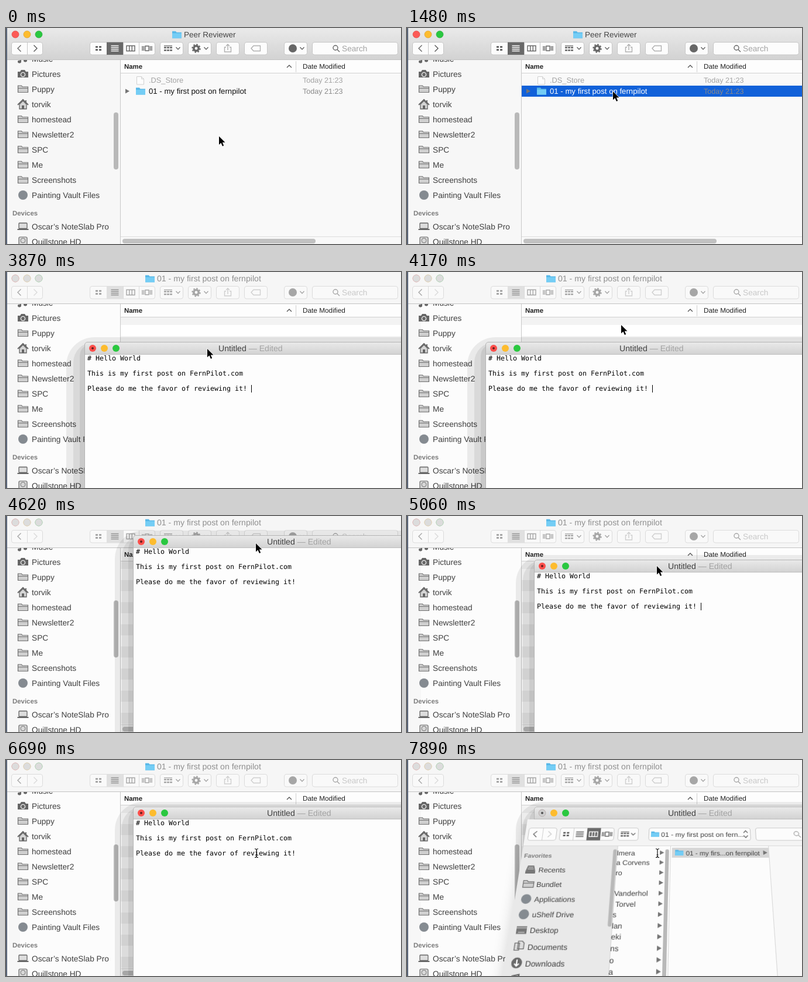
These frames come from a looping animation (675x371 px, 8000 ms). An HTML page:

```html
<!DOCTYPE html>
<html lang="en">
<head>
<meta charset="utf-8">
<title>Saving a post</title>
<style>
html, body { margin: 0; width: 100%; height: 100%; overflow: hidden; background: #f8f8f8; }
.stage { position: absolute; left: 0; top: 0; width: 675px; height: 371px; overflow: hidden; }
svg { position: absolute; left: 0; top: 0; overflow: hidden; }
text { font: 13.7px "Liberation Sans", Arial, sans-serif; fill: #3f3f3f; text-rendering: geometricPrecision; white-space: pre; }
.title { font-size: 14.1px; }
.small { font-size: 11.8px; fill: #222; }
.head { font-size: 11.4px; font-weight: bold; fill: #222; }
.group { font-size: 11.4px; font-weight: bold; fill: #7b7b7b; }
.date { font-size: 12.6px; fill: #8a8a8a; }
.pale { fill: #a3a3a3; }
.code text { font: 11.63px "DejaVu Sans Mono", monospace; fill: #000; }
.btn { fill: #fcfcfc; stroke: #c6c6c6; }
.line { fill: none; stroke: currentColor; stroke-width: 1.4; }
.solid { fill: currentColor; }
.ink { color: #666; }

/* one shared 8 s clock, hard steps */
.t { animation: 8s step-end infinite; }
.closed { animation-name: closed; }
.opened { animation-name: opened; }
.back { animation-name: back; }
.picked { animation-name: picked; }
.name { animation-name: name; }
.fwd { animation-name: fwd; }
.patch { animation-name: patch; }
.dim { animation-name: dim; }
.caption { animation-name: caption; }
.sel { animation-name: sel; }
.selicon { animation-name: selicon; }
.editor { animation-name: editor; }
.caret { animation-name: caret; }
.pressed { animation-name: pressed; }
.arrow { animation-name: arrow; }
.beam { animation-name: beam; }
@keyframes closed { 0% { visibility: visible } 22.125% { visibility: hidden } }
@keyframes opened { 0% { visibility: hidden } 22.125% { visibility: visible } }
@keyframes back { 0% { visibility: hidden } 48.375% { visibility: visible } }
@keyframes picked { 0% { visibility: hidden } 18.5% { visibility: visible } 22.125% { visibility: hidden } }
@keyframes name { 0% { fill: #111 } 18.5% { fill: #fff } }
@keyframes fwd { 0% { color: #555 } 24% { color: #c4c4c4 } }
@keyframes patch { 0% { visibility: hidden } 31.5% { visibility: visible } 48.375% { visibility: hidden } }
@keyframes dim { 0% { opacity: 1 } 48.375% { opacity: .55 } }
@keyframes caption { 0% { fill: #454545 } 48.375% { fill: #8f8f8f } }
@keyframes sel { 0% { fill: #696969 } 48.375% { fill: #cfcfcf } }
@keyframes selicon { 0% { color: #fff } 48.375% { color: #444 } }
@keyframes editor {
  0% { visibility: hidden; transform: translate(134px, 120px) }
  48.375% { visibility: visible; transform: translate(134px, 120px) }
  54% { visibility: visible; transform: translate(160px, 80px) }
  55.875% { visibility: visible; transform: translate(200px, 42px) }
  57.75% { visibility: visible; transform: translate(217px, 33px) }
  59.5% { visibility: visible; transform: translate(217px, 35px) }
  61.375% { visibility: visible; transform: translate(217px, 40px) }
  63.25% { visibility: visible; transform: translate(217px, 75px) }
  65.125% { visibility: visible; transform: translate(217px, 80px) }
}
@keyframes caret { 0% { opacity: 1 } 55.875% { opacity: 0 } 63.25% { opacity: 1 } 70.625% { opacity: 0 } }
@keyframes pressed { 0% { opacity: 0 } 96.75% { opacity: 1 } }
@keyframes arrow {
  0% { transform: translate(364px, 186px) }
  7.375% { transform: translate(363px, 172px) }
  9.25% { transform: translate(358px, 142px) }
  11% { transform: translate(354px, 119px) }
  12.875% { transform: translate(352px, 109px) }
  31.5% { transform: translate(319px, 342px) }
  33.375% { transform: translate(-40px, 0) }
  48.375% { transform: translate(344px, 132px) }
  50.25% { transform: translate(351px, 116px) }
  52.125% { transform: translate(366px, 91px) }
  54% { transform: translate(386px, 66px) }
  55.875% { transform: translate(415px, 52px) }
  57.75% { transform: translate(427px, 47px) }
  59.5% { transform: translate(427px, 48px) }
  61.375% { transform: translate(427px, 53px) }
  63.25% { transform: translate(427px, 86px) }
  65.125% { transform: translate(427px, 91px) }
  68.875% { transform: translate(-40px, 0) }
}
@keyframes beam {
  0% { transform: translate(-40px, 0) }
  68.875% { transform: translate(428px, 112px) }
  70.625% { transform: translate(428px, 132px) }
  72.5% { transform: translate(428px, 147px) }
  74.375% { transform: translate(428px, 156px) }
  76.125% { transform: translate(428px, 160px) }
}

/* the save sheet leans towards the viewer, hinged on its top edge */
.slot { position: absolute; left: 0; top: 102px; width: 675px; height: 269px; overflow: hidden; }
.sheet {
  position: absolute; left: 206px; top: 0; width: 568px; height: 390px; background: #fcfcfc;
  box-shadow: 0 4px 20px rgba(0, 0, 0, .16); transform-origin: 284px 0;
  transform: perspective(900px) rotateX(26.7deg);
  animation: sheet 8s step-end infinite;
}
.sheet text { font-size: 12px; }
.sheet .group { font-size: 10.3px; }
@keyframes sheet { 0% { visibility: hidden } 98.625% { visibility: visible } }
</style>
</head>
<body>
<div class="stage">
<svg width="675" height="371">
  <defs>
    <linearGradient id="bar" x2="0" y2="1"><stop stop-color="#eaeaea"/><stop offset="1" stop-color="#d2d2d2"/></linearGradient>
    <pattern id="rows" width="20" height="38" y="72" patternUnits="userSpaceOnUse">
      <rect width="20" height="38" fill="#fff"/><rect width="20" height="19" fill="#f3f3f3"/>
    </pattern>
    <g id="blue"><path d="M-8 -6h6l1.500 2H8V6H-8z" fill="#58b8e8"/><path d="M-8 -2.500H8V6H-8z" fill="#74cdf5"/></g>
    <g id="folder"><path d="M-8.500 5.500v-11.500h6l1.500 2h9.500v9.500z" fill="#cfcfcf" stroke="#707070" stroke-width="1.200"/><path d="M-8 -1.500H8" stroke="#707070"/></g>
    <g id="note"><path d="M-4 5V-6L6 -8V3" fill="none" stroke="#666" stroke-width="2"/><ellipse cx="-6" cy="5" rx="3" ry="2.400" fill="#666"/><ellipse cx="4" cy="3" rx="3" ry="2.400" fill="#666"/></g>
    <g id="camera"><path d="M-9 -4h4l2-3h6l2 3h4V6H-9z" fill="#666"/><circle cy="1" r="3.600" fill="#666" stroke="#eee" stroke-width="1.400"/></g>
    <g id="house"><path d="M-6 0V8H6V0L0 -6z" fill="#d5d5d5" stroke="#666" stroke-width="1.300"/><path d="M-9 1L0 -8 9 1M5 -7v4" fill="none" stroke="#666" stroke-width="1.800"/><path d="M-2 8V2h4v6z" fill="#666"/></g>
    <g id="disc"><circle r="8" fill="#858b91"/></g>
    <g id="laptop"><rect x="-7" y="-6" width="14" height="9.500" rx="1" fill="#ddd" stroke="#666" stroke-width="1.300"/><path d="M-9.500 5h19" stroke="#666" stroke-width="2"/></g>
    <g id="disk"><rect x="-7" y="-8" width="14" height="17" rx="2" fill="#d8d8d8" stroke="#666" stroke-width="1.200"/><circle cy="-2" r="4" fill="none" stroke="#777"/><path d="M-4 5h8" stroke="#777"/></g>
    <g id="tray"><path d="M-5 -7H5L8 3V7H-8V3z" fill="#777"/><path d="M-4 -4H4M-5 -1H5" stroke="#ddd"/></g>
    <g id="desk"><rect x="-8" y="-6" width="16" height="12" fill="#777"/><path d="M-8 -3.500H8M-5 3.500H5" stroke="#ddd"/></g>
    <g id="docs"><path d="M-7 -5h7v11h-7zM-2 -8h6l3 3v9h-9z" fill="#ddd" stroke="#666" stroke-width="1.200"/></g>
    <g id="down"><circle r="8" fill="#6a6a6a"/><path d="M0 -5V4M-3.500 1L0 4.500 3.500 1" fill="none" stroke="#fff" stroke-width="2"/></g>
    <path id="grid" class="solid" d="M-5 -4h4v3h-4zM1 -4h4v3H1zM-5 1h4v3h-4zM1 1h4v3H1z"/>
    <path id="list" class="line" d="M-6.500 -4.500h13M-6.500 -1.500h13M-6.500 1.500h13M-6.500 4.500h13"/>
    <path id="cols" class="line" d="M-7 -4.500H7v9H-7zM-2.300 -4.500v9M2.300 -4.500v9"/>
    <path id="flow" class="line" d="M-3 -4h6v8h-6zM-5.500 -4v8M5.500 -4v8M-8 -4v8M8 -4v8"/>
    <path id="tiles" class="solid" d="M-7 -5h14v1.300h-14zM-7 -2.500h4v2.500h-4zM-2 -2.500h4v2.500h-4zM3 -2.500h4v2.500h-4zM-7 2h4v2.500h-4zM-2 2h4v2.500h-4zM3 2h4v2.500h-4z"/>
    <path id="v" class="line" d="M-3.500 -2L0 1.700 3.500 -2"/>
    <path id="prev" class="line" d="M2.500 -5.500L-3 0 2.500 5.500"/>
    <path id="next" class="line" d="M-2.500 -5.500L3 0 -2.500 5.500"/>
    <g id="lens" class="line"><circle cx="-1" cy="-1" r="4"/><path d="M2 2l4 4"/></g>
    <path id="tri" d="M-3 -4L4 0 -3 4z" fill="#757575"/>
  </defs>

  <rect width="675" height="371" fill="#f9f9f9"/>
  <rect class="t back" x="196" y="78" width="479" height="280" fill="url(#rows)"/>
  <rect x="196" y="55" width="479" height="22" fill="#fdfdfd"/>
  <path d="M196 77.500H675M495.500 57V76" stroke="#d0d0d0"/>
  <text class="head" x="202" y="70">Name</text>
  <path d="M480 68l4-4 4 4" fill="none" stroke="#555" stroke-width="1.300"/>
  <text class="small" x="507" y="70">Date Modified</text>

  <g class="t closed">
    <path d="M223.500 83.500h8l4 4v9.500h-12zM231.500 83.500v4h4" fill="#fdfdfd" stroke="#d0d0d0"/>
    <text class="pale" style="font-size:12.800px" x="244" y="94">.DS_Store</text>
    <text class="date pale" x="507" y="94">Today 21:23</text>
    <rect class="t picked" x="196" y="99" width="479" height="19" fill="#1161d9"/>
    <use href="#tri" x="207" y="108.500"/>
    <use href="#blue" x="230" y="108.500"/>
    <text class="t name" style="font-size:13.200px" x="244" y="113">01 - my first post on fernpilot</text>
    <text class="date" x="507" y="113">Today 21:23</text>
  </g>
  <g class="t patch">
    <rect x="317" y="102" width="50" height="250" fill="url(#rows)" transform="translate(0 7)"/>
  </g>
  <path d="M196 358.500H675" stroke="#dcdcdc"/>
  <rect x="199" y="362" width="330" height="8" rx="4" fill="#c1c1c1"/>

  <rect y="55" width="195" height="316" fill="#f7f7f7"/>
  <rect class="t back" x="24" y="55" width="171" height="316" fill="#fcfcfc"/>
  <path d="M195.500 55V371" stroke="#c9c9c9"/>
  <g id="places"></g>
  <text class="group" x="11" y="322">Devices</text>
  <rect x="184" y="145" width="8" height="98" rx="4" fill="#b9b9b9"/>

  <rect width="675" height="55" fill="url(#bar)"/>
  <rect class="t back" width="675" height="55" fill="#f6f6f6"/>
  <path d="M0 54.500H675" stroke="#c2c2c2"/>
  <g stroke-width=".7">
    <g class="t lights">
      <circle cx="16" cy="11" r="6" fill="#fc5b57" stroke="#dd4440"/>
      <circle cx="36" cy="11" r="6" fill="#fdbc2e" stroke="#dc9d25"/>
      <circle cx="56" cy="11" r="6" fill="#2ac840" stroke="#25a735"/>
    </g>
    <g class="t back" fill="#dcdcdc" stroke="#d6d6d6"><circle cx="16" cy="11" r="6"/><circle cx="36" cy="11" r="6"/><circle cx="56" cy="11" r="6"/></g>
  </g>
  <g class="t dim ink">
    <g id="buttons"></g>
    <path d="M36.500 25v21M172.500 25v21M200.500 25v21M227.500 25v21" stroke="#c6c6c6"/>
    <use href="#prev" x="23" y="35"/>
    <g class="t fwd"><use href="#next" x="50" y="35"/></g>
    <rect class="t sel" x="172" y="24.500" width="28" height="21.500"/>
    <use href="#grid" x="158" y="35"/>
    <g class="t selicon"><use href="#list" x="186" y="35"/></g>
    <use href="#cols" x="213" y="35"/><use href="#flow" x="241" y="35"/>
    <use href="#tiles" x="277" y="35"/><use href="#v" x="294" y="35"/>
    <circle cx="325" cy="35" r="4.200" class="line" style="stroke-width:3.600"/>
    <circle cx="325" cy="35" r="6.700" class="line" style="stroke-width:2;stroke-dasharray:2.630"/>
    <use href="#v" x="342" y="35"/>
    <g color="#b0b0b0"><path class="line" d="M376 33h-2.500v8h11v-8H382M379 38V28M376 31l3-3 3 3"/>
    <path class="line" d="M419 35l4-4.500h11.500v9H423z"/></g>
    <circle cx="490" cy="35" r="7" fill="#666"/><use href="#v" x="506" y="35"/>
    <use href="#lens" x="564" y="35"/>
    <text x="574" y="40" class="pale">Search</text>
  </g>
  <g class="t closed"><use href="#blue" x="292" y="11.500"/><text class="t caption" style="font-size:13.500px" x="304" y="16">Peer Reviewer</text></g>
  <g class="t opened"><use href="#blue" x="246" y="11.500"/><text class="title t caption" x="258" y="16">01 - my first post on fernpilot</text></g>
  <rect width="2" height="371" fill="#5a667a"/>

  <g class="t editor">
    <g fill="#000" fill-opacity=".07">
      <rect x="-31" y="-8" width="700" height="500" rx="48"/>
      <rect x="-19" y="1" width="700" height="500" rx="34"/>
      <rect x="-8" y="4" width="700" height="500" rx="20"/>
    </g>
    <rect width="700" height="500" rx="5" fill="#fdfdfd"/>
    <path d="M0 22V5a5 5 0 0 1 5-5H700V22z" fill="url(#bar)"/>
    <path d="M0 21.500H700" stroke="#bdbdbd"/>
    <path d="M.5 400V5a4.500 4.500 0 0 1 4.500-4.500H700" fill="none" stroke="#b4b4b4"/>
    <circle cx="14" cy="11" r="6" fill="#fc4f4b"/>
    <circle cx="34" cy="11" r="6" fill="#fdbc2e"/>
    <circle cx="54" cy="11" r="6" fill="#2ac840"/>
    <circle class="t pressed" cx="14" cy="11" r="6" fill="#cfcfcf" stroke="#b5b5b5"/>
    <circle cx="14" cy="11" r="2" fill="#000" fill-opacity=".6"/>
    <text class="title" x="229" y="16">Untitled<tspan fill="#a2a2a2"> — Edited</tspan></text>
    <g class="code">
      <text x="5" y="32"># Hello World</text>
      <text x="5" y="58">This is my first post on FernPilot.com</text>
      <text x="5" y="84">Please do me the favor of reviewing it!</text>
    </g>
    <path class="t caret" d="M285.500 74V87" stroke="#000"/>
  </g>
</svg>

<div class="slot"><div class="sheet">
<svg width="568" height="390">
  <rect width="568" height="50" fill="#f4f4f4"/>
  <rect y="50" width="157" height="340" fill="#e9e9e9"/>
  <rect x="408" y="50" width="160" height="340" fill="#f8f8f8"/>
  <path d="M0 49.500H568M157.500 50V390M245.500 50V390M408.500 50V390" stroke="#d8d8d8"/>
  <g class="ink">
    <g id="tools"></g>
    <path d="M29.500 17v22M81.500 17v22" stroke="#d0d0d0"/>
    <rect x="104" y="16.500" width="23" height="23" fill="#6a6a6a"/>
    <use href="#prev" x="17" y="28"/><g color="#ccc"><use href="#next" x="41" y="28"/></g>
    <use href="#grid" x="69" y="28"/><use href="#list" x="92" y="28"/>
    <g color="#fff"><use href="#cols" x="115" y="28"/></g>
    <use href="#flow" x="138" y="28"/><use href="#tiles" x="168" y="28"/><use href="#v" x="182" y="28"/>
    <use href="#blue" transform="translate(219 28) scale(.85)"/>
    <text x="229" y="32.500">01 - my first post on fern...</text>
    <path class="line" d="M368 25.500l3.500-4 3.500 4M368 30.500l3.500 4 3.500-4"/>
    <g color="#aaa"><use href="#lens" x="458" y="28"/></g>
  </g>
  <text class="group" x="4" y="71">Favorites</text>
  <g id="favs"></g>
  <rect x="150.500" y="56" width="6" height="131" rx="3" fill="#b9b9b9"/>
  <svg x="157" y="50" width="90" height="340"><g id="people"></g></svg>
  <rect x="237" y="56" width="6" height="400" rx="3" fill="#b9b9b9"/>
  <rect x="248" y="53" width="160" height="18" fill="#d6d6d6"/>
  <use href="#blue" transform="translate(260 62) scale(.85)"/>
  <text x="271" y="66.500" style="font-size:11.400px">01 - my firs...on fernpilot</text>
  <use href="#tri" x="402" y="62"/>
</svg>
</div></div>

<svg width="675" height="371">
  <g class="t arrow"><path d="M0 0V14.500L3.400 11.300 5.900 17 8.200 16 5.800 10.500H10.500Z" fill="#000" stroke="#fff" stroke-width="1.200" paint-order="stroke"/></g>
  <g class="t beam"><path d="M-3 -7.500Q0 -7.500 0 -5V5Q0 7.500 -3 7.500M3 -7.500Q0 -7.500 0 -5M0 5Q0 7.500 3 7.500M-1.500 3h3" fill="none" stroke="#111" stroke-width="1.200"/></g>
</svg>
</div>

<script>
const fill = (id, items, draw) => document.getElementById(id).innerHTML = items.map(draw).join("");
const entry = (icon, label, ix, tx, y) =>
  `<use href="#${icon}" x="${ix}" y="${y}"/><text x="${tx}" y="${y + 5}">${label}</text>`;
const button = (y, h) => ([x, w]) => `<rect class="btn" x="${x + .5}" y="${y}" width="${w}" height="${h}" rx="3.5"/>`;

fill("buttons", [[9, 53], [143, 111], [263, 39], [311, 39], [359, 39], [407, 39], [475, 39], [523, 146]], button(24.5, 21.5));
fill("tools", [[5, 47], [58, 91], [156, 34], [208, 171], [388, 190]], button(16.5, 23));

fill("places", [
  ["note", "Music"], ["camera", "Pictures"], ["folder", "Puppy"], ["house", "torvik"], ["folder", "homestead"],
  ["folder", "Newsletter2"], ["folder", "SPC"], ["folder", "Me"], ["folder", "Screenshots"], ["disc", "Painting Vault Files"],
  null, ["laptop", "Oscar’s NoteSlab Pro"], ["disk", "Quillstone HD"]
], (p, i) => p ? entry(...p, 29, 44, 53 + 26 * i + (i > 10 ? 2 : 0)) : "");

fill("favs", [
  ["tray", "Recents"], ["folder", "Bundlet"], ["disc", "Applications"], ["disc", "uShelf Drive"],
  ["desk", "Desktop"], ["docs", "Documents"], ["down", "Downloads"], ["note", "Music"]
], (p, i) => entry(...p, 18, 31, 92 + 25.1 * i));

fill("people", ["lmera", "a Corvens", "ro", "", "Vanderhol", " Torvel", "s", "lan", "eki", "ns", "o", "a"], (n, i) => {
  const y = 12 + 17.6 * i;
  return `<text x="0" y="${y + 4.5}">${n}</text><use href="#tri" x="74" y="${y}"/>`;
});
</script>
</body>
</html>
```
